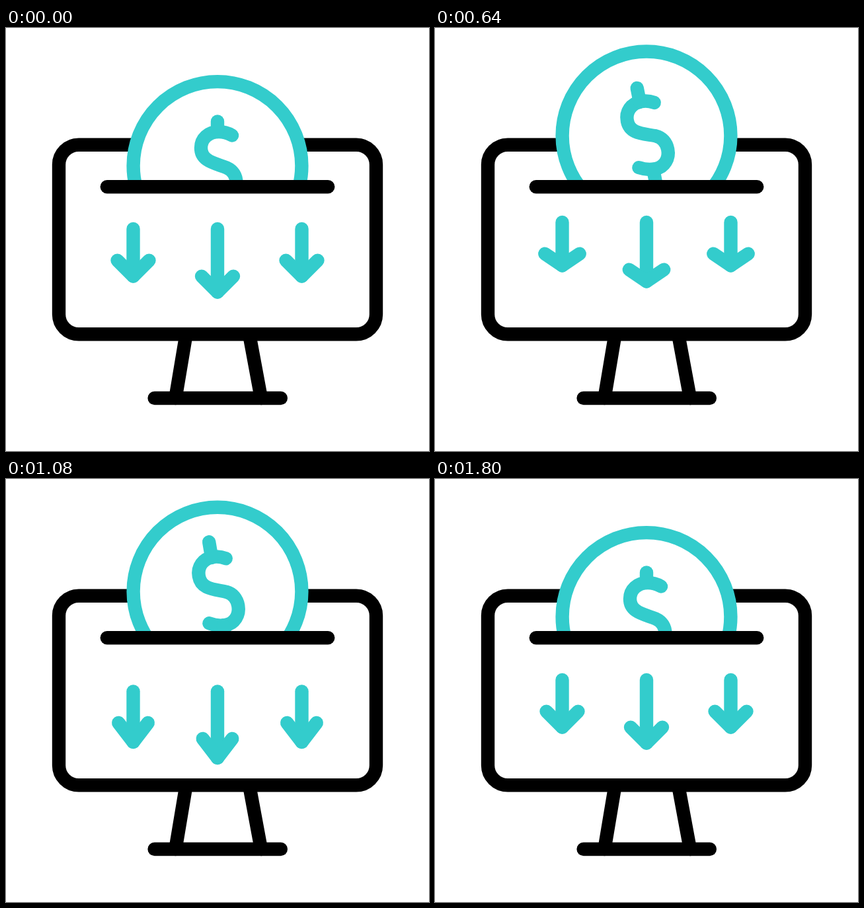
Animation of 640 by 640 pixels, one loop 2 s. Source, as an HTML page with a canvas:

```html
<!DOCTYPE html>
<html lang="en">
<head>
<meta charset="utf-8">
<title>Coin into monitor</title>
<style>
  html, body { margin: 0; height: 100%; overflow: hidden; background: #fff; }
  canvas { display: block; }
</style>
</head>
<body>
<canvas id="stage" width="640" height="640"></canvas>
<script>
const ctx = document.getElementById('stage').getContext('2d');
const LOOP = 2000, STEP = 40;
const TEAL = '#33cccc', BLACK = '#000';
const RADIUS = 127.4, REST_Y = 208.5;
const DOLLAR = new Path2D(
  'M22 -46 C15 -50 8 -51.5 2 -51.5 C-14 -51.5 -25 -41 -25 -27 ' +
  'C-25 -7 -4 -4 14 3 C23 7 28.5 15 28.5 26 C28.5 40 18 51 4 51 C-4 51 -12 49.5 -21.5 44.3');

function smooth(u) {
  u = Math.min(1, Math.max(0, u));
  return u * u * (3 - 2 * u);
}

// Starts at a value, then eases to each move's target and holds it.
const motion = (start, ...moves) => t => moves.reduce(
  (value, [from, to, target]) => value + (target - value) * smooth((t - from) / (to - from)), start);

// The monitor gives way each time a coin is pushed in.
const pulse = (t, peak) => smooth(1 - Math.abs(t - peak) / 120);
const bump = t => pulse(t, 760) + pulse(t, 1200);

const leaving = {
  y: motion(REST_Y, [80, 460, 142.6], [560, 1010, 386]),
  angle: motion(0, [80, 460, -12.8], [560, 1010, 6]),
  stretch: motion(0, [80, 440, 6.5])
};
const arriving = {
  y: motion(-179, [567, 1204, REST_Y]),
  angle: motion(30, [560, 1320, -22], [1320, 1760, 0]),
  stretch: motion(4.5, [920, 1080, 9], [1080, 1320, 0])
};
const arrowShift = motion(0, [80, 240, 18.5], [240, 440, -10],
  [680, 980, 18.5], [1050, 1300, -10], [1400, 1800, 0]);
const arrowStretch = motion(0, [80, 240, 5], [320, 600, -7],
  [600, 880, 5], [1080, 1440, -7], [1440, 1800, 0]);

function line(...points) {
  ctx.beginPath();
  points.forEach(([x, y]) => ctx.lineTo(x, y));
  ctx.stroke();
}

function drawCoin(coin, t, drop) {
  const stretch = coin.stretch(t), scale = 0.005 * stretch, end = 67 + stretch;
  const dollar = new Path2D();
  dollar.addPath(DOLLAR, new DOMMatrix([1 - scale, 0, 0, 1 + scale / 2, 0, 0]));
  ctx.save();
  ctx.translate(320, coin.y(t) + drop);
  ctx.beginPath();
  ctx.arc(0, 0, RADIUS, 0, 2 * Math.PI);
  ctx.fill();
  ctx.stroke();
  ctx.rotate(coin.angle(t) * Math.PI / 180);
  ctx.stroke(dollar);
  line([0, -end], [0, -52]);
  line([0, 52], [0, end]);
  ctx.restore();
}

function drawArrow(x, length, t) {
  const top = 304 + arrowShift(t), stretch = arrowStretch(t);
  const wing = top + length, tip = wing + 24 + stretch, half = 24 - 0.35 * stretch;
  line([x, top], [x, tip]);
  line([x - half, wing], [x, tip], [x + half, wing]);
}

function draw(t) {
  const b = bump(t), drop = 11.6 * b;
  const top = 176.8 + drop, bottom = 463.2 + 7.8 * b, slot = 240.2 + drop;

  ctx.fillStyle = '#fff';
  ctx.fillRect(0, 0, 640, 640);
  ctx.lineWidth = 20.4;
  ctx.lineCap = ctx.lineJoin = 'round';

  ctx.strokeStyle = BLACK;
  line([272.6, bottom], [256.4 - 7 * b, 560]);
  line([368, bottom], [386 + 7 * b, 560]);
  line([224.6 - 7.6 * b, 560], [415.8 + 12 * b, 560]);
  ctx.beginPath();
  ctx.roundRect(80, top, 480, bottom - top, 30);
  ctx.stroke();

  ctx.strokeStyle = TEAL;
  ctx.save();
  ctx.beginPath();
  ctx.rect(0, 0, 640, slot);
  ctx.clip();
  if (t < 1010) drawCoin(leaving, t, drop);
  if (t > 600) drawCoin(arriving, t, drop);
  ctx.restore();

  drawArrow(192.5, 47.6, t);
  drawArrow(320, 71.6, t);
  drawArrow(447.5, 47.6, t);

  ctx.strokeStyle = BLACK;
  line([152.8, slot], [487.2, slot]);
}

const start = performance.now();
function frame() {
  const t = (performance.now() - start) % LOOP;
  draw(Math.floor(t / STEP) * STEP);
  requestAnimationFrame(frame);
}
frame();
</script>
</body>
</html>
```
